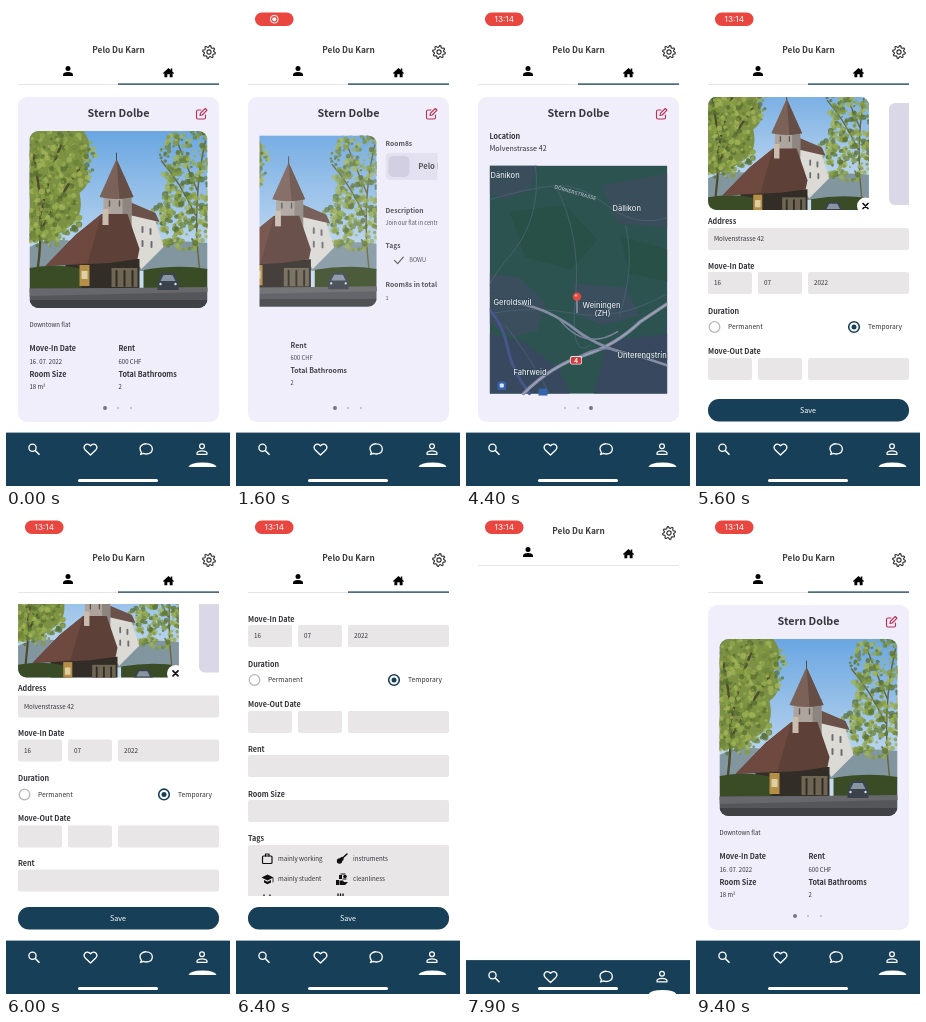
Animation, 224 px wide and 480 px high, one loop 9500 ms. Source, as an HTML page:

```html
<!DOCTYPE html>
<html lang="en">
<head>
<meta charset="utf-8">
<title>Flat profile</title>
<style>
html, body { margin: 0; width: 100%; height: 100%; overflow: hidden; background: #fff; }
svg { display: block; width: 224px; height: 480px; font-family: "Noto Sans CJK JP", "Noto Sans CJK SC", "Noto Sans", sans-serif; }
.line { fill: none; stroke-linecap: round; stroke-linejoin: round; }
.map text, #clock text { font-family: Inter, sans-serif; }
</style>
</head>
<body>
<svg id="stage" viewBox="0 0 224 480"></svg>
<script>
const NAVY = '#173f58', INK = '#303036', FIELD = '#e8e6e6', LILAC = '#f1eefb';
const OWNER = 'Pelo Du Karn', STREET = 'Molvenstrasse 42';
const PAGE = { width: 178, cx: 112.5, cy: 260 };

// Text is placed by its vertical centre.
const text = (x, y, s, size = 6, weight = 400, fill = INK, anchor = 'start') =>
  `<text x="${x}" y="${y + size * 0.36}" font-size="${size}" font-weight="${weight}" fill="${fill}" text-anchor="${anchor}">${s}</text>`;
const label = (x, y, s) => text(x, y, s, 7.2, 700);
const rect = (x, y, w, h, fill, r = 0) =>
  `<rect x="${x}" y="${y}" width="${w}" height="${h}" rx="${r}" fill="${fill}"/>`;
const circle = (x, y, r, fill, stroke = 'none', w = 1) =>
  `<circle cx="${x}" cy="${y}" r="${r}" fill="${fill}" stroke="${stroke}" stroke-width="${w}"/>`;
const shape = (d, fill) => `<path d="${d}" fill="${fill}"/>`;
const line = (d, stroke, w = 1) => `<path class="line" d="${d}" stroke="${stroke}" stroke-width="${w}"/>`;
const group = (id, body) => `<g id="${id}">${body}</g>`;

let seed = 11;
const random = () => (seed = (seed * 16807) % 2147483647) / 2147483647;

// Small leaves scattered over an ellipse.
function foliage(cx, cy, rx, ry, count) {
  const greens = ['#6d8438', '#82983f', '#93a84c', '#5a7132', '#a3b45a'];
  let out = '';
  for (let i = 0; i < count; i++) {
    const a = random() * 6.283, d = random() ** 0.6;
    const x = cx + Math.cos(a) * d * rx, y = cy + Math.sin(a) * d * ry;
    out += `<circle cx="${x.toFixed(1)}" cy="${y.toFixed(1)}" r="${(1 + random() * 2.2).toFixed(1)}" fill="${greens[i % 5]}" opacity=".75"/>`;
  }
  return out;
}

const photo =
  rect(0, 0, 178, 177, 'url(#sky)') +
  shape('M0 116Q24 104 50 112V140H0Z M100 124Q134 106 178 112V140H100Z', '#8296a0') +
  shape('M0 0H54Q66 16 54 32Q66 50 50 62Q56 88 36 98Q20 112 0 110Z', '#7d9145') +
  line('M8 140Q16 80 4 24M13 96Q34 60 52 34M12 80Q20 40 34 8', '#4d4a2c', 2.4) +
  foliage(20, 30, 46, 42, 330) + foliage(18, 86, 34, 30, 200) +
  line('M170 138Q162 70 176 10M166 84Q150 50 132 30M168 60Q155 30 146 6', '#66663f', 1.5) +
  foliage(160, 34, 32, 42, 230) + foliage(154, 88, 32, 32, 210) +
  shape('M98 72L124 84L134 116L112 138L98 120Z', '#dcdad5') +
  shape('M98 70L126 82L130 91L100 84Z', '#6a5149') +
  line('M113 96V101M121 98V103M113 110V115M122 111V116', '#6c6d70', 2) +
  rect(74, 60, 28, 40, '#aca49d') + rect(93, 60, 9, 40, '#8d857f') +
  line('M80 70V75M90 70V75', '#5d5753', 1.5) +
  shape('M87 28L70 66Q86 70 104 66Z', '#7b6259') + shape('M87 28L90 68L104 66Z', '#654e46') +
  line('M87 29V22', '#554843', 1) +
  shape('M36 128H110V158H36Z', '#332d27') +
  shape('M72 83L98 83L110 118L108 128L80 132L16 135L46 104Z', '#5d4038') +
  shape('M72 83L46 104L16 135L58 132Z', '#6d493f') +
  rect(73, 78, 6, 16, '#cabdad') +
  rect(82, 137, 26, 19, '#6e6553') + line('M87 140V155M95 140V155M103 140V155', '#2f2b26', 2) +
  shape('M0 137Q28 132 52 138V161H0Z M114 139Q148 133 178 138V161H114Z', '#3a4c26') +
  rect(0, 157, 178, 20, '#55565a') + shape('M0 158L178 156V161L0 165Z', '#67686b') +
  rect(0, 169, 178, 8, '#3f4144') +
  rect(50, 134, 10, 21, '#b58e48') + rect(52, 140, 6, 8, '#ddcfa4') +
  shape('M128 159V151L132 142H145L149 151V159Z', '#3c424b') + shape('M131 150L134 144H143L146 150Z', '#8795a2') +
  circle(131, 153, 1.2, '#dce4ea') + circle(146, 153, 1.2, '#dce4ea');

function gear() {
  let d = '';
  for (let i = 0; i < 32; i++) {
    const a = (i + 0.5) * Math.PI / 16, r = i % 4 < 2 ? 6.4 : 4.8;
    d += (i ? 'L' : 'M') + (Math.cos(a) * r).toFixed(2) + ' ' + (Math.sin(a) * r).toFixed(2);
  }
  return line(d + 'Z', '#2c2c2c', 1.1) + circle(0, 0, 2.1, 'none', '#2c2c2c', 1.1);
}

const header =
  text(112.5, 44, OWNER, 8.3, 700, '#3c3c3c', 'middle') +
  `<g transform="translate(203 46)">${group('gear', gear())}</g>` +
  circle(62, 62.4, 2.5, '#000') + shape('M57 70V68.800Q57.200 66 62 66T67 68.800V70Z', '#000') +
  shape('M157 67L162.5 62L164.800 64V62.400H166.300V65.400L168 67L167.200 67.900L166.600 67.300V71.300H163.700V68.300H161.300V71.300H158.400V67.300L157.800 67.900Z', '#000') +
  rect(12, 78, 201, 0.7, '#dcdce0') +
  group('underline', rect(112, 77.4, 101, 1.4, '#255069'));

const overview =
  `<clipPath id="round"><rect x="23.5" y="125" width="178" height="177" rx="9"/></clipPath>` +
  `<g clip-path="url(#round)"><use href="#photo" x="23.5" y="125"/></g>` +
  text(23.5, 318.5, 'Downtown flat') +
  label(23.5, 342, 'Move-In Date') + text(23.5, 355.5, '16. 07. 2022') +
  label(23.5, 368, 'Room Size') + text(23.5, 381, '18 m²') +
  label(112.5, 342, 'Rent') + text(112.5, 355.5, '600 CHF') +
  label(112.5, 368, 'Total Bathrooms') + text(112.5, 381, '2');

const details =
  label(23.5, 129.2, 'Room8s') +
  rect(23.5, 138.8, 178, 29, '#e0ddec', 5) + rect(26.5, 142, 22.5, 22.5, '#cbc7de', 5) +
  text(58.5, 153, OWNER, 8.3, 700) +
  label(23.5, 201, 'Description') + text(23.5, 214.4, 'Join our flat in central Zürich') +
  label(23.5, 238.5, 'Tags') + line('M33 254L36.500 257.500L42.500 250.500', '#333', 1.1) + text(49, 253.6, 'BOWU') +
  label(23.5, 280.4, 'Room8s in total') + text(23.5, 294.3, '1');

const town = (x, y, s) =>
  `<text x="${x}" y="${y + 2.7}" font-size="7.5" font-weight="500" fill="#e6e9ee" stroke="#2d4351" stroke-width="1.2" paint-order="stroke">${s}</text>`;
const map =
  rect(0, 0, 178, 228, '#2d5350') +
  shape('M0 0H48L40 24L16 34L0 28Z M112 20L178 8V62L128 58Z', '#394d5b') +
  shape('M0 108L30 112L56 138L48 165L22 172L0 158Z M84 118L136 122L150 150L112 160L86 148Z', '#3a4e5d') +
  shape('M0 168L34 176L70 204L80 228H0Z M118 176L178 168V228H104Z', '#38485e') +
  shape('M20 46L76 40L108 74L82 104L36 92Z M130 70L178 84V116L140 108Z', '#295047') +
  line('M0 34Q42 22 66 20T118 40T178 52M46 0Q52 52 22 88T0 128M66 20Q92 70 86 132T100 180M0 148Q44 140 86 148T178 128M16 160Q40 190 60 228M136 60Q146 100 130 150', '#4c6472', 0.8) +
  line('M0 144Q14 160 18 182T40 228', '#46558a', 3) +
  line('M34 228Q62 200 94 190T151 156L178 138', '#858ca4', 3.4) +
  line('M34 228Q62 200 94 190T151 156L178 138', '#a9aec0', 1) +
  line('M30 138Q60 144 86 164T151 191L178 200', '#858ca4', 2.6) +
  line('M70 154Q96 186 128 166M88 192Q112 176 140 189', '#7c849d', 1.5) +
  town(1, 10, 'Dänikon') + town(123, 43, 'Dällikon') + town(4, 137, 'Geroldswil') +
  town(93, 139.5, 'Weiningen') + town(105, 148, '(ZH)') + town(24, 207, 'Fahrweid') + town(128, 190, 'Unterengstringen') +
  `<g transform="translate(65 21) rotate(16)">${text(0, 0, 'DÖRNERSTRASSE', 5, 500, '#b4bdc7')}</g>` +
  line('M87.5 133V147', '#c9ccd2', 0.9) + circle(87.5, 131, 4.2, '#e34a40') + circle(86.5, 129.8, 1.2, '#f6aaa2') +
  rect(80.5, 190.5, 12, 8.5, '#e9e4e4', 2) + rect(81.3, 191.3, 10.4, 6.9, '#d2393c', 1.5) +
  text(86.5, 194.8, '4', 6, 700, '#fff', 'middle') +
  rect(8, 216, 8.5, 8.5, '#3564ad', 1.5) + rect(10.3, 218, 4, 4, '#dce6f4', 1) +
  rect(49, 223, 9, 9, '#3564ad', 1.5);

const place =
  label(23.5, 130.2, 'Location') + text(23.5, 142.4, STREET, 7.2) +
  `<svg class="map" x="23.5" y="159.6" width="178" height="230">${map}</svg>`;

const card =
  rect(12, 91, 201, 325, LILAC, 9) +
  text(112.5, 107.5, 'Stern Dolbe', 10.75, 700, '#38363f', 'middle') +
  line('M195 104H192Q190.5 104 190.5 105.5V111.5Q190.5 113 192 113H198Q199.500 113 199.500 111.500V109M194 109.500L194.500 107.200L199.300 102.500L201 104.200L196.200 109Z', '#bd2f57', 1.15) +
  `<clipPath id="pager"><rect x="23.5" y="115" width="178" height="277"/></clipPath>` +
  `<g clip-path="url(#pager)">${[overview, details, place].map(p => `<g class="page">${p}</g>`).join('')}</g>` +
  [99, 112, 125].map(x => `<circle class="dot" cx="${x}" cy="402"/>`).join('');

const field = (x, y, w, s = '', h = 22) => rect(x, y, w, h, FIELD, 2) + text(x + 6, y + 11, s, 6.3);
const dateRow = (y, d = '', m = '', yr = '') => field(12, y, 44, d) + field(62, y, 44, m) + field(112, y, 101, yr);

const tagIcons =
  `<rect class="line" x="26.500" y="497" width="9.500" height="7.500" rx="1" stroke="#111" stroke-width="1.200"/>` +
  line('M29.500 497V495H33V497', '#111', 1.2) +
  circle(103.5, 502, 2.7, '#111') + circle(105.8, 500, 1.9, '#111') + line('M105 500.500L111 495', '#111', 1.6) +
  shape('M25.500 518.500L31.500 515.500L37.500 518.500L31.500 521.500Z M28 521L31.500 522.700L35 521V523.500L31.500 525.200L28 523.500Z', '#111') +
  line('M37 519V523', '#111', 0.8) +
  shape('M100 521H103V526H100Z M103.500 521.500H107L108 523H112L109 526H103.500Z M103 516H106V520H103Z', '#111') +
  circle(109, 517.5, 1.8, '#111') + line('M105 515H109M107 520H110', '#111', 1) +
  line('M28 536V541M34 536V541M102 535V541M104.500 535V541M107 535V541', '#111', 1.3);

const formBody =
  `<svg x="12" y="91" width="161" height="113" viewBox="0 26 178 125"><clipPath id="crop"><rect y="26" width="178" height="125" rx="9"/></clipPath><g clip-path="url(#crop)"><use href="#photo"/></g></svg>` +
  circle(169.5, 200, 8.5, '#fff') + line('M167 197.500L172 202.500M172 197.500L167 202.500', '#111', 1.7) +
  rect(193, 97, 40, 102, '#dad7e6', 6) +
  label(12, 215, 'Address') + field(12, 222, 201, STREET) +
  label(12, 260, 'Move-In Date') + dateRow(266, '16', '07', '2022') +
  label(12, 305, 'Duration') +
  circle(18.5, 321, 5.3, '#fff', '#b9b9bd', 1.3) + text(32, 321, 'Permanent', 6.7) +
  circle(158, 321, 5.3, '#fff', NAVY, 1.6) + circle(158, 321, 2.5, NAVY) + text(172, 321, 'Temporary', 6.7) +
  label(12, 345, 'Move-Out Date') + dateRow(352) +
  label(12, 390, 'Rent') + field(12, 396, 201) +
  label(12, 435, 'Room Size') + field(12, 441, 201) +
  label(12, 479, 'Tags') + field(12, 486, 201, '', 90) +
  text(42, 500, 'mainly working', 6.2) + text(117, 500, 'instruments', 6.2) +
  text(42, 520, 'mainly student', 6.2) + text(117, 520, 'cleanliness', 6.2) + tagIcons;

const form =
  `<clipPath id="window"><rect x="11" y="90" width="202" height="292"/></clipPath>` +
  `<g clip-path="url(#window)">${group('scroll', formBody)}</g>` +
  rect(12, 393, 201, 22.5, NAVY, 11) + text(112, 404, 'Save', 7.2, 400, '#fff', 'middle');

const bar =
  rect(0, 426.6, 224, 60, NAVY) +
  circle(26.5, 441.8, 3.6, 'none', '#fff', 1.3) + line('M29.500 444.800L33 448.300', '#fff', 1.6) +
  line('M84.500 449L79.500 444.200C76 440.500 80.500 435.500 84.500 439.800C88.500 435.500 93 440.500 89.500 444.200Z', '#fff', 1.3) +
  line('M135.500 446.500C131 439.500 138 437.500 140.500 437.800C148 438 148.500 447.500 140.500 448Q139 448 137.500 447.400L134.500 448.500Z', '#fff', 1.3) +
  circle(196, 440.3, 2.4, 'none', '#fff', 1.2) + line('M191 448.300V447Q191.500 444.800 196 444.800T201 447V448.300Z', '#fff', 1.2) +
  shape('M182.500 461Q184 456.500 196.500 456.500T210.500 461Z', '#fff');

const pill =
  rect(19, 6.5, 38.5, 13.5, '#ea4640', 6.7) +
  group('record', circle(38.3, 13.2, 3.9, 'none', '#fff', 1) + circle(38.3, 13.2, 2, '#fff')) +
  group('clock', text(38.3, 13.2, '13:14', 8.2, 400, '#fff', 'middle'));

document.getElementById('stage').innerHTML =
  `<defs><linearGradient id="sky" x2="0" y2="1"><stop stop-color="#6aa6e2"/><stop offset=".75" stop-color="#c6dcf0"/></linearGradient>${group('photo', photo)}</defs>` +
  group('header', header) + group('card', card) + group('form', form) + group('bar', bar) +
  rect(72, 473, 80, 3, '#fff', 1.5) + group('pill', pill);

const $ = id => document.getElementById(id);
const pages = document.querySelectorAll('.page');
const dots = document.querySelectorAll('.dot');
const show = (id, on) => $(id).style.display = on ? '' : 'none';
const move = (id, x, y) => $(id).setAttribute('transform', `translate(${x} ${y})`);
const ease = (t, from, length) => {
  const p = Math.min(1, Math.max(0, (t - from) / length));
  return p * p * (3 - 2 * p);
};

// Pages away from the middle shrink and fade.
function turnPages(position) {
  const { width, cx, cy } = PAGE;
  pages.forEach((page, i) => {
    const offset = i - position, away = Math.min(1, Math.abs(offset));
    page.setAttribute('transform', `translate(${cx + width * offset} ${cy}) scale(${1 - 0.1 * away}) translate(${-cx} ${-cy})`);
    page.setAttribute('opacity', 1 - 0.3 * away);
  });
}

function draw(t) {
  const editing = t >= 4500 && t < 7700;
  const loading = t >= 7700 && t < 8000;
  const saved = t >= 8000;

  show('card', !editing && !loading);
  show('form', editing);
  show('underline', !loading);
  move('header', 0, loading ? -27 : 0);
  move('bar', 0, loading ? 19.5 : 0);
  $('gear').setAttribute('transform', loading ? 'rotate(22.5)' : '');

  turnPages(saved ? 0 : ease(t, 1355, 645) + ease(t, 2640, 600));
  const current = saved || t < 1950 ? 0 : t < 3200 ? 1 : 2;
  dots.forEach((dot, i) => {
    dot.setAttribute('r', i === current ? 2 : 1);
    dot.setAttribute('fill', i === current ? '#77747f' : '#b9b6c2');
  });
  move('scroll', 0, -155 * ease(t, 5800, 600));

  $('pill').setAttribute('opacity', ease(t, 100, 300));
  show('record', t < 4400);
  show('clock', t >= 4400);
}

function tick() {
  draw(performance.now() % 9500);
  requestAnimationFrame(tick);
}
tick();
</script>
</body>
</html>
```
